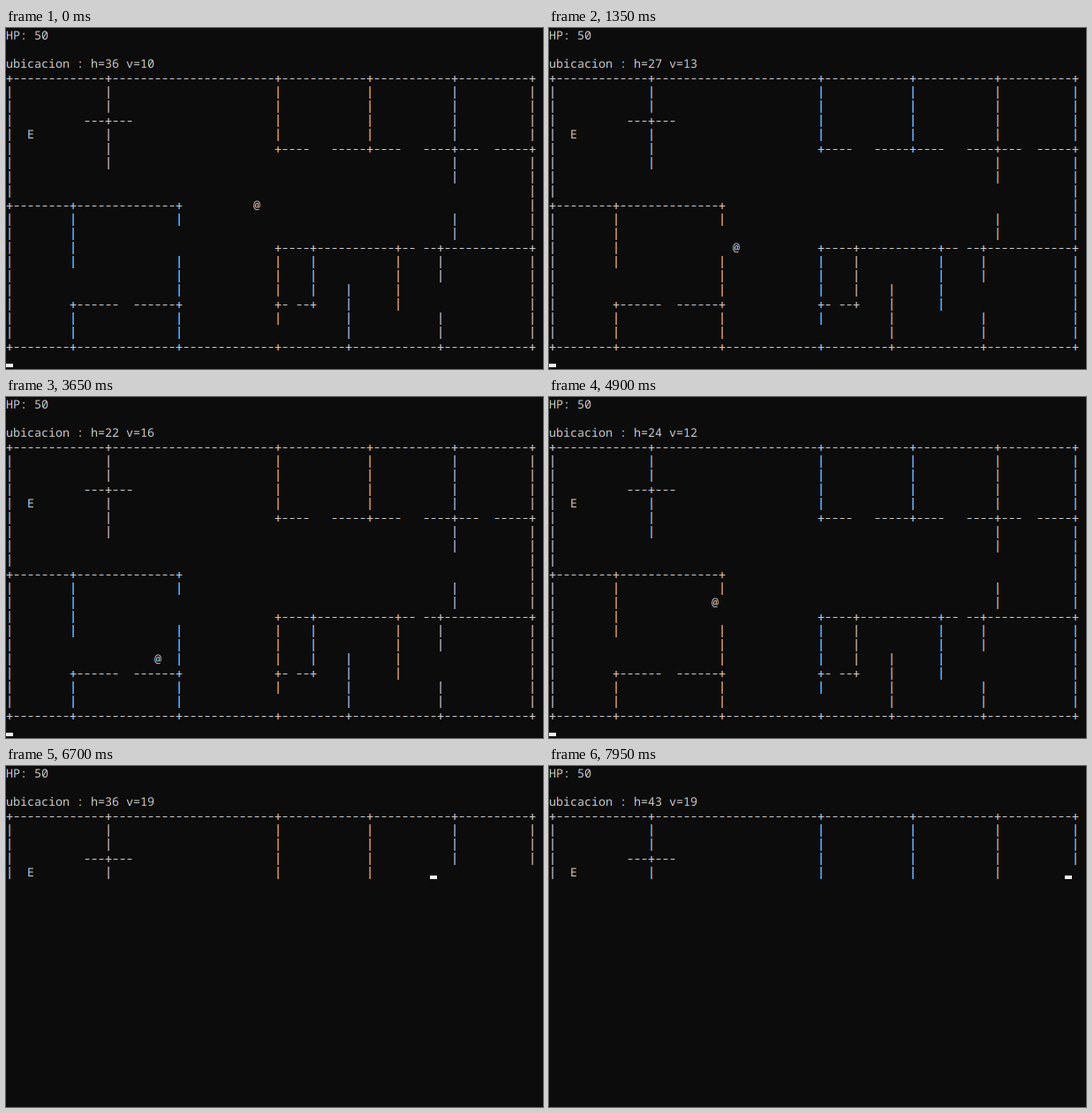
These frames come from a looping animation (608 by 386 pixels, 8000 ms). An HTML page with a canvas:

```html
<!DOCTYPE html>
<html>
<head>
<meta charset="utf-8">
<style>
html, body { margin: 0; width: 100%; height: 100%; overflow: hidden; background: #0c0c0c; }
canvas { display: block; }
</style>
</head>
<body>
<canvas width="608" height="386"></canvas>
<script>
const ctx = document.querySelector('canvas').getContext('2d');
const COLS = 76, W = 8, H = 16, TOP = 3, TICK = 50, LOOP = 8000;

const map = `
+-------------+-----------------------+------------+-----------+----------+
|             |                       |            |           |          |
|             |                       |            |           |          |
|          ---+---                    |            |           |          |
|  E          |                       |            |           |          |
|             |                       +----   -----+----   ----+---  -----+
|             |                                                |          |
|                                                              |          |
|                                                                         |
+--------+--------------+                                                 |
|        |              |                                      |          |
|        |                                                     |          |
|        |                            +----+-----------+-- --+------------+
|        |              |             |    |           |     |            |
|                       |             |    |           |     |            |
|                       |             |    |    |      |                  |
|        +------  ------+             +- --+    |      |                  |
|        |              |             |         |            |            |
|        |              |                       |            |            |
+--------+--------------+-------------+---------+------------+------------+
`.trim().split('\n');
const FULL = (TOP + map.length) * COLS;

// Bursts of keys: start and end in ms, then the moves; a dot redraws in place
const bursts = [
  [50, 400, 'ddd'], [600, 1350, 'lllllllll'], [1450, 1500, 'l'], [1700, 1950, 'll'],
  [2950, 3650, 'llddd'], [4350, 4900, 'uuuurr'], [5050, 5850, 'rrrrrrdddd'],
  [5900, 6200, 'dddrr'], [6400, 6750, 'rrrr'], [6800, 7200, 'rrrrrr'],
  [7250, 7650, '....'], [7950, 8000, 'r']
];

// Where the printing of the map has got to, drifting against the screen refresh
const cutAt = tick => TOP * COLS + Math.floor((114.94 + 1019.16 * tick) % 1498);

function stateAt(tick) {
  let h = 36, v = 10, end = FULL;
  for (const [start, stop, keys] of bursts) {
    const t = tick * TICK - start;
    if (t < 0) break;
    const p = Math.min(1, (t + TICK) / (stop - start + TICK)) * keys.length;
    const done = Math.ceil(p);
    for (const key of keys.slice(0, done)) {
      h += (key === 'r') - (key === 'l');
      v += (key === 'd') - (key === 'u');
    }
    end = p - done + 1 > 0.5 ? FULL : cutAt(tick);
  }
  return { h, v, end };
}

function glyph(ch, c, r) {
  const x = c * W, y = r * H;
  if (ch === '|') ctx.fillRect(x + 3.4, y + 2, 1.2, 14);
  else if (ch === '-') ctx.fillRect(x + 1.6, y + 9, 4.8, 1);
  else if (ch === '+') {
    ctx.fillRect(x + 0.6, y + 9, 6.8, 1);
    ctx.fillRect(x + 3.4, y + 6, 1.2, 3);
    ctx.fillRect(x + 3.4, y + 10, 1.2, 3);
  } else if (ch !== ' ') ctx.fillText(ch, x, y + 13);
}

function print(text, row) {
  [...text].forEach((ch, c) => glyph(ch, c, row));
}

function drawText({ h, v, end }) {
  print('HP: 50', 0);
  print(`ubicacion : h=${h} v=${v}`, 2);
  map.forEach((line, i) => {
    const row = TOP + i;
    if (i === v - 1) line = line.slice(0, h - 1) + '@' + line.slice(h);
    print(line.slice(0, Math.max(0, end - row * COLS)), row);
  });
}

function draw(tick) {
  const state = stateAt(tick);
  ctx.globalCompositeOperation = 'source-over';
  ctx.fillStyle = '#0c0c0c';
  ctx.fillRect(0, 0, 608, 386);
  ctx.fillStyle = '#f2f2f2';
  ctx.fillRect(state.end % COLS * W, Math.floor(state.end / COLS) * H + 12, W, 4);

  // Subpixel text: each colour channel is shifted by a third of a pixel
  ctx.globalCompositeOperation = 'lighter';
  ctx.font = '13.33px "Noto Sans Mono", monospace';
  ctx.textRendering = 'geometricPrecision';
  ['#c00000', '#00c000', '#0000c0'].forEach((color, i) => {
    ctx.setTransform(1, 0, 0, 1, (1 - i) / 3, 0);
    ctx.fillStyle = color;
    drawText(state);
  });
  ctx.resetTransform();
}

const start = performance.now();
let shown = -1;
function loop() {
  const tick = Math.floor((performance.now() - start) % LOOP / TICK);
  if (tick !== shown) draw(shown = tick);
  requestAnimationFrame(loop);
}
loop();
</script>
</body>
</html>
```
